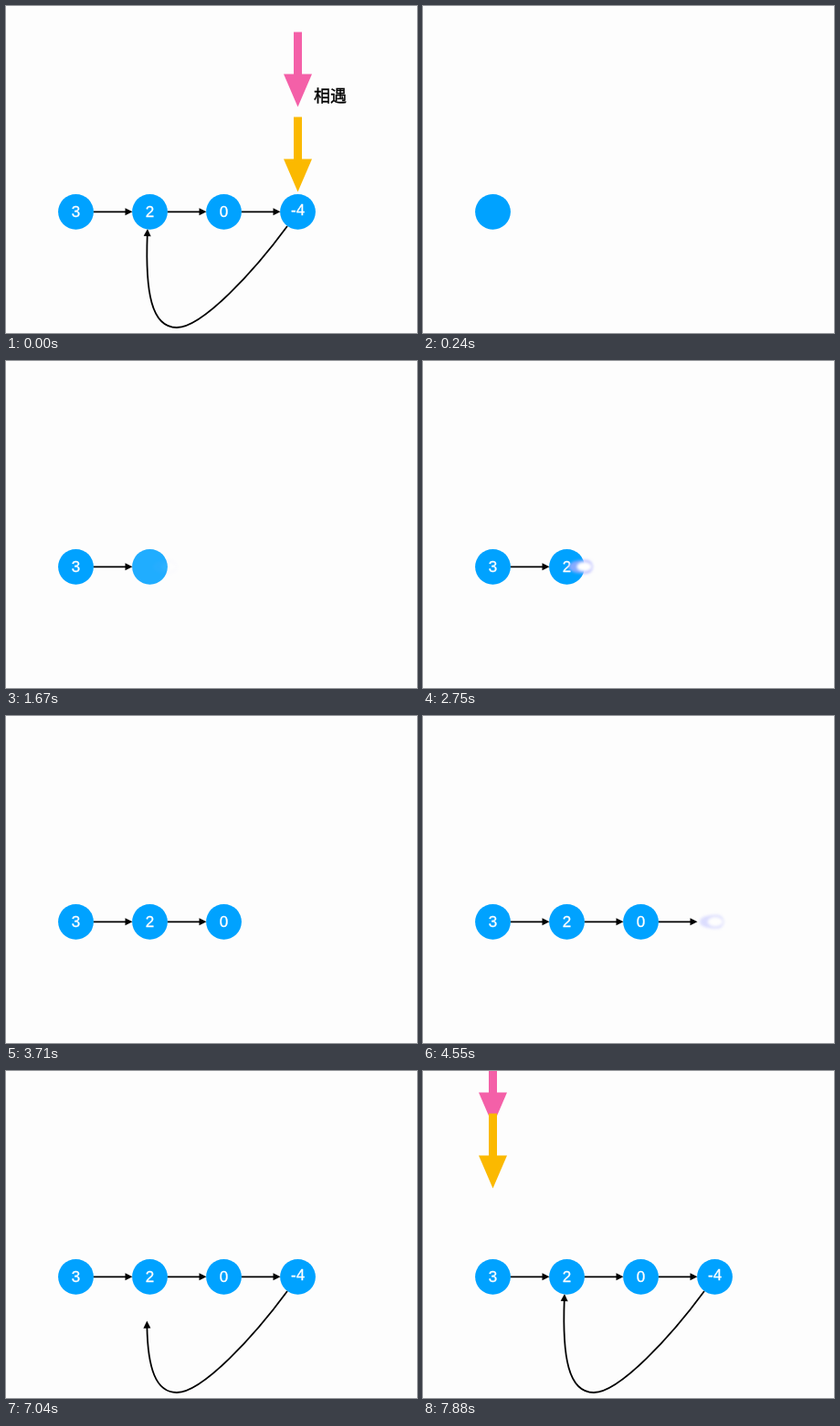
An HTML page for the animation above (8 s loop, 450 by 358 pixels).

```html
<!DOCTYPE html>
<html lang="zh">
<head>
<meta charset="utf-8">
<style>
  html, body { margin: 0; width: 100%; height: 100%; overflow: hidden; background: #fdfdfd; }
  svg { display: block; width: 450px; height: 358px; }
  .digit { font: 17px "Liberation Sans", Arial, sans-serif; fill: #fff; stroke: #fff; stroke-width: .35; }
  .label { font: 500 18px "Noto Sans CJK SC", "Noto Sans CJK", sans-serif; stroke: #000; stroke-width: .35; }
  .link { fill: none; stroke: #000; stroke-width: 1.8; }
</style>
</head>
<body>
<svg viewBox="0 0 450 358">
  <defs>
    <clipPath id="reveal"><rect id="revealBox" height="358"/></clipPath>
    <filter id="soft" x="-50%" y="-50%" width="200%" height="200%"><feGaussianBlur stdDeviation="1.6"/></filter>
    <path id="head" d="M0 0L-8 -4V4Z"/>
    <path id="pointer" d="M-4.5 -82H4.5V-36H15.5L0 0L-15.5 -36H-4.5Z"/>
  </defs>
  <g id="links" clip-path="url(#reveal)"></g>
  <path id="loop" class="link" d="M308 241C272 290 215 352 187 352C158 352 152 310 155 244"/>
  <use id="loopHead" href="#head"/>
  <g id="nodes"></g>
  <g id="comet">
    <g filter="url(#soft)">
      <path d="M-18 0C-18 -7 -3 -7.5 1 -7.5A7.5 7.5 0 0 1 1 7.5C-3 7.5 -18 7 -18 0Z" fill="#a9adff" opacity=".8"/>
      <ellipse cx="-1" rx="8" ry="5" fill="#fff"/>
    </g>
  </g>
  <use id="pink" href="#pointer" fill="#f460a8"/>
  <use id="yellow" href="#pointer" fill="#fbb900"/>
  <text id="label" class="label" x="337" y="105">相遇</text>
</svg>
<script>
const LOOP = 8000, FRAMES = 67, STEP = LOOP / FRAMES;
const NODE_X = [76.5, 157.5, 238.5, 319.5], NODE_Y = 225.3;
const COMET_START = [10.1, 22.4, 34.9], COMET_LIFE = 4;
const TYPED_AT = [[6], [18], [31], [42, 44]];
const VALUES = ["3", "2", "0", "-4"];

const $ = id => document.getElementById(id);
const clamp = v => Math.max(0, Math.min(1, v));
const show = (el, opacity) => el.setAttribute("opacity", +opacity);
const move = (el, x, y, angle = 0) =>
  el.setAttribute("transform", `translate(${x} ${y}) rotate(${angle})`);

$("links").innerHTML = COMET_START.map((_, i) => {
  const x = NODE_X[i];
  return `<path class="link" d="M${x + 19} ${NODE_Y}H${x + 56}"/>
    <use href="#head" x="${x + 62}" y="${NODE_Y}"/>`;
}).join("");

$("nodes").innerHTML = NODE_X.map((x, i) => {
  const long = VALUES[i].length > 1;
  return `<g><circle cx="${x}" cy="${NODE_Y}" r="19.4" fill="#00a2ff"/>
    <text class="digit" x="${long ? 312 : x - 4.7}" y="${long ? 228.5 : 231.3}"></text></g>`;
}).join("");

const nodes = [...$("nodes").children];
const loop = $("loop"), loopLength = loop.getTotalLength();

function drawComets(frame, full) {
  let reveal = full ? 450 : 0;
  show($("comet"), 0);
  COMET_START.forEach((start, i) => {
    const age = frame - start;
    const x = NODE_X[i] + 5 + 25 * age;
    if (full || age < -.5) return;
    reveal = Math.min(x - 14, NODE_X[i] + 63);
    if (age < COMET_LIFE) {
      move($("comet"), x, NODE_Y);
      show($("comet"), clamp((COMET_LIFE - age) / 1.8));
    }
  });
  $("revealBox").setAttribute("width", Math.max(0, reveal));
}

function drawNodes(frame, full) {
  nodes.forEach((node, i) => {
    const appear = i ? clamp((frame - COMET_START[i - 1] - 3.2) / .8) : frame >= 2;
    show(node, full || appear);
    const count = full ? 2 : TYPED_AT[i].filter(at => frame >= at).length;
    node.lastChild.textContent = VALUES[i].slice(0, count);
  });
}

function drawLoop(frame, full) {
  const p = full ? 1 : clamp((frame - 47.5) / 14.5);
  const length = loopLength * (1 - Math.cos(Math.PI * p)) / 2;
  const tip = loop.getPointAtLength(length);
  const back = loop.getPointAtLength(Math.max(0, length - 7));
  loop.setAttribute("stroke-dasharray", `${Math.max(0, length - 6)} 999`);
  move($("loopHead"), tip.x, tip.y, Math.atan2(tip.y - back.y, tip.x - back.x) * 180 / Math.PI);
  show(loop, p > 0);
  show($("loopHead"), p > 0);
}

function drawPointers(frame, full) {
  const rest = full ? 0 : (1 - clamp((frame - 61.1) / 9.9)) ** 2;
  const x = NODE_X[full ? 3 : 0];
  move($("pink"), x, 110.5 - 200 * rest);
  move($("yellow"), x, 203.5 - 294 * rest);
  show($("label"), full);
}

function draw(now) {
  const frame = Math.min(FRAMES - 1, Math.floor((now % LOOP + 6) / STEP));
  const full = frame === 0;
  for (const part of [drawComets, drawNodes, drawLoop, drawPointers]) part(frame, full);
  requestAnimationFrame(() => draw(performance.now() - begin));
}

const begin = performance.now();
draw(0);
</script>
</body>
</html>
```
